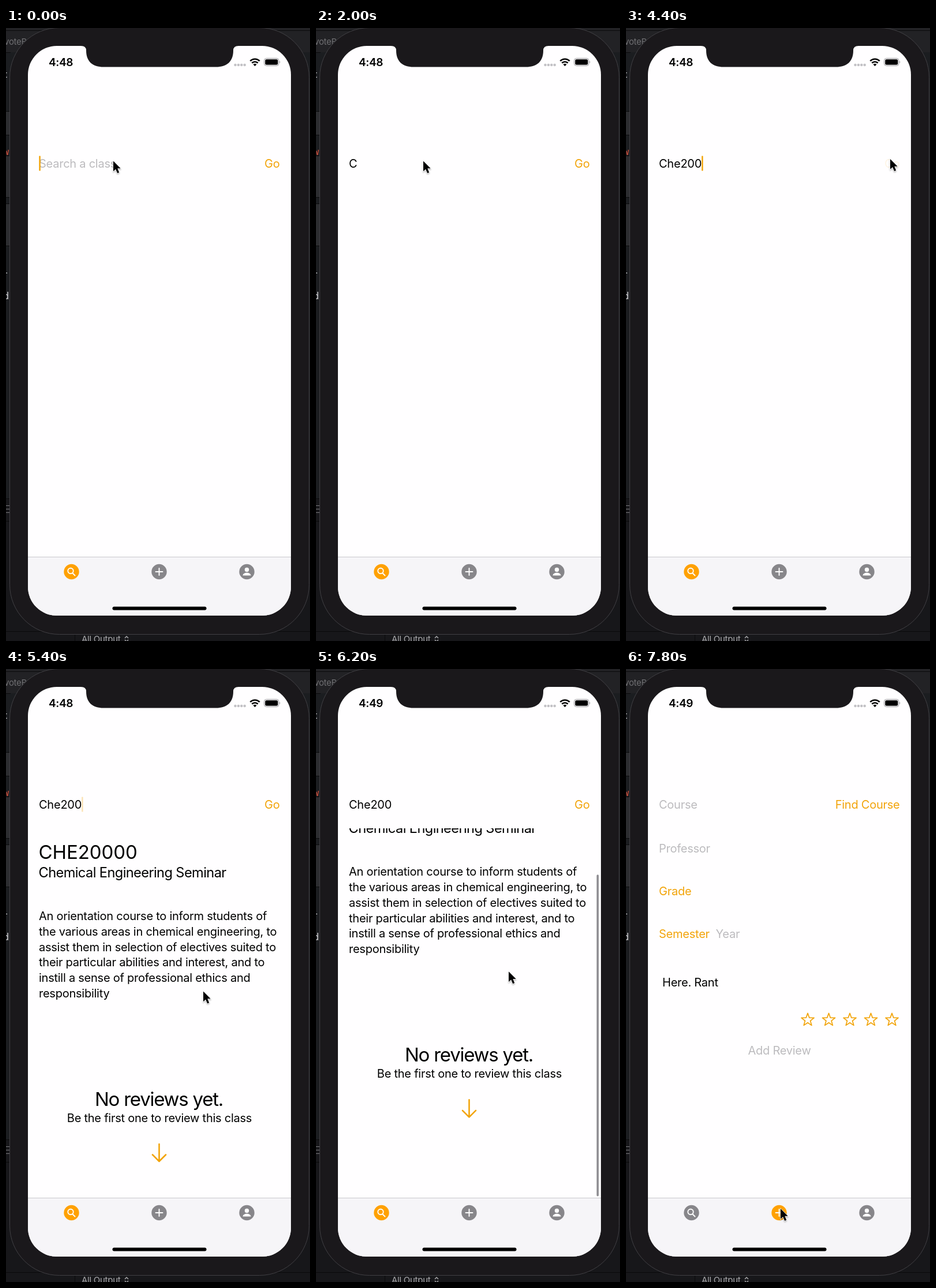
An HTML page that plays this animation: 527x1062 px, repeating every 8 s.

```html
<!DOCTYPE html>
<html lang="en">
<head>
<meta charset="utf-8">
<title>Class search</title>
<style>
  html, body { margin: 0; width: 100%; height: 100%; overflow: hidden; background: #1b1c1f; }
  svg { display: block; width: 100vw; height: 100vh; }
  text { font: 20.05px Inter, "Open Sans", sans-serif; font-optical-sizing: none; letter-spacing: -.26px; white-space: pre; }
  .title { font-size: 33px; letter-spacing: -.08px; }
  .tight { letter-spacing: -1.25px; }
  .sub { font-size: 23.6px; letter-spacing: -.59px; }
  .clock { font-size: 19px; font-weight: 600; letter-spacing: -.4px; }
  .amber { fill: #f2a40a; }
  .hint { fill: #bcbbbe; }
  .end { text-anchor: end; }
  .mid { text-anchor: middle; }
  .back text { font-size: 15px; fill: #a9a9ac; }
  .back .mono { font: 17px "Noto Sans Mono", monospace; fill: #d5d5d8; }
  .stroke { fill: none; stroke: #f2a40a; stroke-width: 2.6; stroke-linecap: round; stroke-linejoin: round; }
  .glyph { fill: none; stroke: #fff; stroke-width: 1.9; stroke-linecap: round; }
</style>
</head>
<body>
<svg viewBox="0 0 527 1062" preserveAspectRatio="none">
  <defs>
    <clipPath id="screen"><rect x="38" y="31" width="456" height="987" rx="50"/></clipPath>
    <clipPath id="list"><rect x="38" y="276" width="456" height="641"/></clipPath>
    <filter id="shade" x="-50%" y="-50%" width="200%" height="200%">
      <feDropShadow dx="0" dy="1.5" stdDeviation="1.2" flood-opacity=".35"/>
    </filter>
  </defs>

  <!-- desktop behind the phone -->
  <g class="back">
    <path fill="#222225" d="M0 0H527V42H0z"/>
    <path fill="#1b1d20" d="M0 42H527V816H0z"/>
    <path fill="#17171a" d="M0 816H527V1062H0z"/>
    <path fill="#2c2d30" stroke="#0a0a0b" d="M-1 144.500h9v41h-9zM-1 221.500h9v72h-9zM-1 304.500h9v73h-9z"/>
    <path stroke="#0a0a0b" d="M0 4.500H527M0 42.500H8M0 815.500H8M0 854.500H8M0 1045.500H527M119.500 1046V1062"/>
    <text x="-3" y="29" style="fill:#707073">voteB</text>
    <text class="mono" x="-7" y="86">t:</text>
    <text class="mono" x="-5" y="220" style="fill:#d8533f">w</text>
    <text class="mono" x="-7" y="425">i.</text>
    <text class="mono" x="-5" y="470">d</text>
    <path stroke="#7b7b7e" d="M0 827.500H6M0 833.500H6M0 839.500H6"/>
    <text x="131" y="1064">All Output</text>
    <path fill="none" stroke="#a9a9ac" stroke-width="1.500" d="M206 1057l3-3 3 3M206 1060l3 3 3-3"/>
  </g>

  <rect x="6.500" y="-.5" width="519" height="1051" rx="86" fill="#1a181b" stroke="#414044"/>

  <g clip-path="url(#screen)">
    <path fill="#fffeff" d="M38 31H494V1018H38z"/>
    <text id="clock" class="clock" x="74" y="66"></text>

    <path stroke="#c3c2c6" stroke-width="4.600" stroke-linecap="round" stroke-dasharray="0 5.400" d="M397.500 64H414"/>
    <path fill="none" stroke="#000" stroke-width="2.600" d="M423.300 57.200a11.500 11.500 0 0 1 16.400 0M426.300 60.700a7.300 7.300 0 0 1 10.400 0"/>
    <path d="M431.500 66.200l-3-3.100a4.300 4.300 0 0 1 6 0z"/>
    <rect x="447.500" y="52.500" width="25.500" height="13" rx="4" fill="none" stroke="#99989c"/>
    <rect x="449.200" y="54.200" width="22.100" height="9.600" rx="2.500"/>
    <path fill="#99989c" d="M474.300 57q2.200 2 0 4z"/>

    <g id="search">
      <g id="results" clip-path="url(#list)">
        <g id="content">
          <text class="title" x="56.500" y="329">CHE20000</text>
          <text class="sub" x="56.500" y="360.500">Chemical Engineering Seminar</text>
          <g id="about"></g>
          <text class="title tight mid" x="265" y="757">No reviews yet.</text>
          <text class="mid" x="266" y="785">Be the first one to review this class</text>
          <path class="stroke" d="M265.500 823V852M254 841.500L265.500 853 277 841.500"/>
        </g>
        <rect id="bar" x="486.500" width="3.600" rx="1.800" fill="#8f8e92"/>
      </g>
      <text id="query" x="57" y="242"></text>
      <text id="go" class="amber end" x="474.500" y="242">Go</text>
      <rect id="caret" class="amber" y="221.500" width="2.500" height="26" rx="1"/>
    </g>

    <g id="form">
      <text class="hint" x="57" y="242">Course</text>
      <text class="amber end" x="474.500" y="242">Find Course</text>
      <text class="hint" x="57" y="317.500">Professor</text>
      <text class="amber" x="57" y="391.500">Grade</text>
      <text class="amber" x="57" y="466">Semester</text>
      <text class="hint" x="155.500" y="466">Year</text>
      <text x="63" y="550">Here. Rant</text>
      <g id="stars"></g>
      <text class="hint mid" x="266" y="668">Add Review</text>
    </g>

    <path fill="#f6f5f8" d="M38 917H494V1018H38z"/>
    <path stroke="#c9c8cc" d="M38 916.500H494"/>
    <circle id="findTab" cx="113.500" cy="942" r="13.200"/>
    <circle id="addTab" cx="265.500" cy="942" r="13.200"/>
    <circle cx="417.500" cy="942" r="13.200" fill="#87868a"/>
    <path class="glyph" d="M115.500 944.500l4 4M259.500 942h12M265.500 936v12"/>
    <circle class="glyph" cx="112" cy="940.500" r="4.700"/>
    <circle cx="417.500" cy="938.500" r="3.700" fill="#fff"/>
    <path fill="#fff" d="M410.500 948.500c0-6.500 14-6.500 14 0z"/>
    <rect x="184.500" y="1002.500" width="163" height="6" rx="3"/>
  </g>

  <path fill="#1a181b" d="M130 30V31Q139 31 139 39C139 58 150 67.500 169 67.500H364C383 67.500 394 58 394 39Q394 31 403 31V30z"/>

  <path id="cursor" d="M0 0V17.800L4.100 14 7.100 21 10.200 19.700 7.300 12.800H12.700z"
    stroke="#fff" stroke-width="1.300" paint-order="stroke" filter="url(#shade)"/>
</svg>

<script>
const LOOP = 8000, STEP = 200;
const FIRST_KEY = 1400, TAP_GO = 4400, RESULTS = 4800, RELEASE = 6200, FORM = 7400;
const QUERY = "Che200";

const el = id => document.getElementById(id);
const set = (id, name, value) => el(id).setAttribute(name, value);
const show = (id, on) => set(id, "visibility", on ? "visible" : "hidden");
const clamp = v => Math.min(1, Math.max(0, v));
const ease = (t, from, to) => {
  const p = clamp((t - from) / (to - from));
  return p * p * (3 - 2 * p);
};

const lines = [
  "An orientation course to inform students of",
  "the various areas in chemical engineering, to",
  "assist them in selection of electives suited to",
  "their particular abilities and interest, and to",
  "instill a sense of professional ethics and",
  "responsibility"
];
el("about").innerHTML = lines.map((s, i) =>
  `<text x="57" y="${435 + i * 26.75}">${s}</text>`).join("");

const star = Array.from({ length: 10 }, (_, i) => {
  const r = i % 2 ? 4.8 : 11.6, a = i * Math.PI / 5;
  return [r * Math.sin(a), -r * Math.cos(a)].map(v => v.toFixed(2));
}).join(" ");
el("stars").innerHTML = [0, 1, 2, 3, 4].map(i =>
  `<polygon class="stroke" style="stroke-width:1.7" points="${star}" transform="translate(${315 + i * 36.5} 608)"/>`).join("");

const moves = [
  { from: 3400, to: 4200, x: 458, y: 227 },
  { from: 4600, to: 5200, x: 342, y: 558.5 },
  { from: 5400, to: 5800, x: 342, y: 398 },
  { from: 6000, to: 6600, x: 311.5, y: 885 },
  { from: 6600, to: 7000, x: 268, y: 935 }
];

function pointer(t) {
  let x = 186, y = 230.5;
  for (const m of moves) {
    const p = ease(t, m.from, m.to);
    x += (m.x - x) * p;
    y += (m.y - y) * p;
  }
  return `translate(${x} ${y})`;
}

// The first letter comes early, the rest at a steady pace
const keyTime = n => n < 1 ? 0 : n === 1 ? FIRST_KEY : 1600 + 300 * n;

function typedCount(t) {
  let n = 0;
  while (n < QUERY.length && t >= keyTime(n + 1)) n++;
  return n;
}

// Solid just after input, then pulsing once a second
function caretOpacity(t, count) {
  const age = t - (t >= TAP_GO ? TAP_GO : keyTime(count));
  return age < 500 ? 1 : clamp(.3 + 1.5 * Math.sin(age * Math.PI / 500));
}

// Pulled past the end, then springing back
const scroll = t => 76.7 * ease(t, 5400, 5800) * Math.exp(-Math.max(0, t - RELEASE) / 182);

function draw(t) {
  const count = typedCount(t);
  const onForm = t >= FORM;
  const y = scroll(t);

  el("clock").textContent = t < 5600 ? "4:48" : "4:49";
  el("query").textContent = count ? QUERY.slice(0, count) : "Search a class";
  set("query", "class", count ? "" : "hint");
  set("caret", "x", count ? 57 + el("query").getComputedTextLength() : 57.3);
  set("caret", "opacity", caretOpacity(t, count));
  set("go", "opacity", 1 - .9 * clamp(1 - Math.abs(t - TAP_GO) / 400));

  set("content", "transform", `translate(0 ${-y})`);
  set("bar", "y", 279.5 + y);
  set("bar", "height", 634 - y);
  set("bar", "opacity", ease(t, 5400, 5600) - ease(t, 6800, 7200));

  show("search", !onForm);
  show("results", !onForm && t >= RESULTS);
  show("form", onForm);
  set("findTab", "fill", onForm ? "#87868a" : "#ffa100");
  set("addTab", "fill", onForm ? "#ffa100" : "#87868a");
  set("cursor", "transform", pointer(t));
}

const start = performance.now();
function tick() {
  const t = (performance.now() - start) % LOOP;
  draw(Math.floor(t / STEP) * STEP);
  requestAnimationFrame(tick);
}
tick();
</script>
</body>
</html>
```
